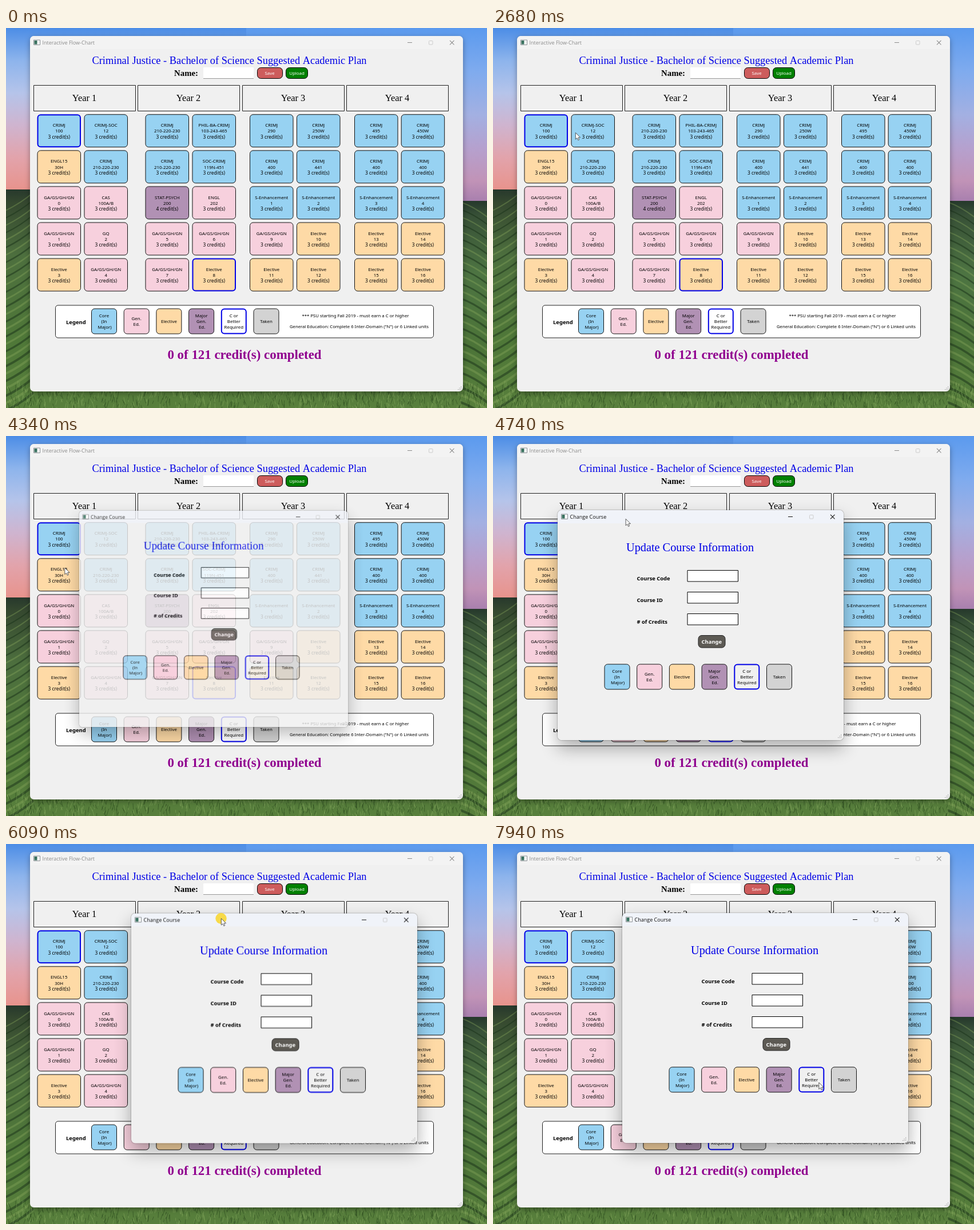
Recreate the animation shown at these times as an HTML page with a canvas. Size 841 px wide and 666 px high, loop 8000 ms.

```html
<!DOCTYPE html>
<html lang="en">
<head>
<meta charset="utf-8">
<title>Interactive Flow-Chart</title>
<style>
  html, body { margin: 0; width: 100%; height: 100%; overflow: hidden; }
  canvas, svg { position: absolute; left: 0; top: 0; }
  #dialog { transform-origin: 0 0; border-radius: 7px;
    box-shadow: 0 14px 30px rgba(0,0,0,.32), 0 0 2px rgba(0,0,0,.55); }
  #pointer { overflow: visible; }
</style>
</head>
<body>
<canvas id="base" width="841" height="666"></canvas>
<canvas id="dialog" width="500" height="403"></canvas>
<svg id="pointer" width="1" height="1">
  <circle id="press" r="9.7" fill="#f8d52a" fill-opacity=".85"/>
  <path d="M.3 0V11.6L3 9.2 4.8 13.2 6.7 12.4 5 8.4H8.6Z" fill="#fff" stroke="#333" stroke-width=".8"/>
</svg>
<script>
const $ = id => document.getElementById(id);
const SERIF = '"Liberation Serif", "Times New Roman", serif';
const SANS = '"Noto Sans", Tahoma, sans-serif';
const UI = '"Open Sans", "Segoe UI", sans-serif';
const BLUE = '#0000e6';
const FILL = { b: '#97d2f2', p: '#f7d0dd', e: '#fedaa6', m: '#b191b4', t: '#d3d3d3', n: 'transparent' };
let ctx;

function text(str, x, y, font, color = '#000', align = 'center') {
  ctx.font = font;
  ctx.fillStyle = color;
  ctx.textAlign = align;
  ctx.textBaseline = 'alphabetic';
  ctx.fillText(str, x, y);
}

function box(x, y, w, h, r, fill, stroke = '#000', line = 1) {
  ctx.beginPath();
  ctx.roundRect(x, y, w, h, r);
  ctx.fillStyle = fill;
  ctx.fill();
  if (!stroke) return;
  ctx.strokeStyle = stroke;
  ctx.lineWidth = line;
  ctx.stroke();
}

function line(color, width, ...points) {
  ctx.beginPath();
  points.forEach(([x, y], i) => i ? ctx.lineTo(x, y) : ctx.moveTo(x, y));
  ctx.strokeStyle = color;
  ctx.lineWidth = width;
  ctx.stroke();
}

// Rounded tile with centred lines of text; required tiles get a blue border.
function tile(x, y, w, h, kind, required, lines) {
  if (required) box(x + .5, y + .5, w - 1, h - 1, 5, FILL[kind], BLUE, 2);
  else box(x, y, w, h, 5.5, FILL[kind], '#111');
  lines.forEach((s, i) => {
    const size = s.includes('credit') ? 8.4 : 7.9;
    text(s, x + w / 2, y + h / 2 + 3.2 + (i - (lines.length - 1) / 2) * 10.1, `${size}px ${SANS}`);
  });
}

function swatches(x, y) {
  ['b|Core|(In| Major)', 'p|Gen.|Ed.', 'e|Elective', 'm|Major|Gen.| Ed.', 'n|C or|Better|Required', 't|Taken']
    .forEach((item, i) => {
      const [kind, ...lines] = item.split('|');
      tile(x + i * 56.7, y, 44, 44, kind, kind === 'n', lines);
    });
}

function titleBar(x, y, w, title, color, fill) {
  box(x, y, w, 23, [7, 7, 0, 0], fill, null);
  box(x + 6.5, y + 7, 11, 8.5, 0, '#fff', '#8a8f94');
  box(x + 7.5, y + 8, 5, 6.5, 0, '#39705f', null);
  text(title, x + 21.5, y + 15.3, `9px ${UI}`, color, 'left');
  const r = x + w, m = y + 11.5;
  line(color, 1, [r - 97, m], [r - 89, m]);
  box(r - 59.5, m - 3, 6.5, 6.5, 1, 'transparent', '#ccc');
  line(color, 1.1, [r - 23, m - 3.7], [r - 15.5, m + 3.8]);
  line(color, 1.1, [r - 15.5, m - 3.7], [r - 23, m + 3.8]);
}

function grip(x, y) {
  for (const [i, j] of [[0, 0], [0, 1], [1, 0], [0, 2], [2, 0], [1, 1]])
    box(x - i * 2.5, y - j * 2.5, 1.3, 1.3, 0, '#aaa', null);
}

function gradient(x, y, w, h, y2, stops) {
  const g = ctx.createLinearGradient(0, y, 0, y2);
  stops.forEach(([at, color]) => g.addColorStop(at, color));
  ctx.fillStyle = g;
  ctx.fillRect(x, y, w, h);
}

function landscape() {
  let seed = 7;
  const rnd = () => (seed = seed * 16807 % 2147483647) / 2147483647;
  gradient(0, 0, 420, 284, 284, [[0, '#4c8de6'], [.2, '#8db4ec'], [.4, '#b5c4ea'], [.6, '#cfb4cf'], [.8, '#e2a3ab'], [1, '#e8938c']]);
  gradient(420, 0, 421, 304, 304, [[0, '#5b9aee'], [.25, '#7fabee'], [.5, '#a3b0e2'], [.7, '#b6a0cd'], [.88, '#c193b7'], [1, '#a87fae']]);
  gradient(0, 283, 420, 383, 666, [[0, '#27382c'], [.06, '#35482f'], [.3, '#4d6f3e'], [.7, '#4f7838'], [1, '#587f3c']]);
  gradient(420, 303, 421, 363, 666, [[0, '#25382b'], [.07, '#385137'], [.35, '#4d7442'], [.7, '#4c7438'], [1, '#587f3c']]);
  for (let i = 0; i < 28; i++) {
    const y = 310 + i * 13;
    ctx.lineWidth = 2 + i * .08;
    ctx.strokeStyle = i % 2 ? 'rgba(24,48,24,.5)' : 'rgba(140,172,96,.35)';
    ctx.beginPath();
    ctx.moveTo(-5, y + 12);
    ctx.quadraticCurveTo(25, y - 2, 48, y - 22);
    ctx.moveTo(795, y - 5);
    ctx.quadraticCurveTo(820, y + 4, 845, y + 24);
    ctx.stroke();
  }
  for (let i = 0; i < 900; i++) {
    const x = rnd() * 841, y = 628 + rnd() * 45;
    line(i % 2 ? 'rgba(30,58,22,.45)' : 'rgba(150,186,108,.4)', 1, [x, y], [x + rnd() * 8 - 4, y - 5 - rnd() * 8]);
  }
}

const ROWS = [
  'b!CRIMJ|100,bCRIMJ-SOC|12,bCRIMJ|210-220-230,bPHIL-BA-CRIMJ|103-243-465,bCRIMJ|290,bCRIMJ|250W,bCRIMJ|495,bCRIMJ|450W',
  'eENGL15|30H,bCRIMJ|210-220-230,bCRIMJ|210-220-230,bSOC-CRIMJ|119N-451,bCRIMJ|400,bCRIMJ|441,bCRIMJ|400,bCRIMJ|400',
  'pGA/GS/GH/GN|0,pCAS|100A/B,mSTAT-PSYCH|200,pENGL|202,bS-Enhancement|1,bS-Enhancement|2,bS-Enhancement|3,bS-Enhancement|4',
  'pGA/GS/GH/GN|1,pGQ|2,pGA/GS/GH/GN|5,pGA/GS/GH/GN|6,pGA/GS/GH/GN|9,eElective|10,eElective|13,eElective|14',
  'eElective|3,pGA/GS/GH/GN|4,pGA/GS/GH/GN|7,e!Elective|8,eElective|11,eElective|12,eElective|15,eElective|16'
];
const COLUMNS = [55, 137, 244, 326, 426.5, 508.5, 609.5, 691.2];

function drawBase() {
  ctx = $('base').getContext('2d');
  landscape();
  ctx.shadowColor = 'rgba(0,0,0,.35)';
  ctx.shadowBlur = 10;
  ctx.shadowOffsetY = 3;
  box(42, 14, 757, 623, 7, '#f0f0f0', null);
  ctx.shadowColor = 'transparent';
  titleBar(42, 14, 757, 'Interactive Flow-Chart', '#8b8b8b', '#f3f3f3');
  grip(795, 633);

  text('Criminal Justice - Bachelor of Science Suggested Academic Plan', 390.5, 63, `18.4px ${SERIF}`, BLUE);
  text('Name:', 315, 84, `bold 14.8px ${SERIF}`);
  box(345, 69, 88, 20, 1, '#fff', null);
  line('#999', 1, [345, 88.5], [433, 88.5]);
  box(439.5, 69.5, 44, 19, 6, '#cd5c5c');
  box(489.5, 69.5, 38, 19, 6, '#008000');
  text('Save', 461, 82.3, `7.9px ${SANS}`, '#fff');
  text('Upload', 508.5, 82.3, `7.9px ${SANS}`, '#fff');

  for (let i = 0; i < 4; i++) {
    const x = Math.round(48 + i * 182.4) + .5;
    box(x, 100.5, 178, 45, 0, 'transparent', '#222');
    text('Year ' + (i + 1), x + 88.5, 128, `16.4px ${SERIF}`);
  }

  ROWS.forEach((row, r) => row.split(',').forEach((cell, c) => {
    const required = cell[1] === '!';
    const lines = cell.slice(required ? 2 : 1).split('|');
    lines.push((cell[0] === 'm' ? 4 : 3) + ' credit(s)');
    tile(COLUMNS[c], 151.7 + r * 63.1, 75.5, 57, cell[0], required, lines);
  }));

  box(86.5, 486, 661, 57, 4.5, '#fff', '#222');
  text('Legend', 105, 518.5, `bold 9.5px ${SANS}`, '#000', 'left');
  swatches(149.5, 492);
  text('*** PSU starting Fall 2019 - must earn a C or higher', 611, 506.6, `7.75px ${SANS}`);
  text('General Education: Complete 6 Inter-Domain ("N") or 6 Linked units', 617.5, 525.5, `7.7px ${SANS}`);
  text('0 of 121 credit(s) completed', 417, 579.5, `bold 22.9px ${SERIF}`, '#90008f');
}

function drawDialog() {
  ctx = $('dialog').getContext('2d');
  box(0, 0, 500, 403, 7, '#f0f0f0', null);
  titleBar(0, 0, 500, 'Change Course', '#111', '#f0f3f9');
  grip(495, 398);
  text('Update Course Information', 231.5, 71.5, `20.3px ${SERIF}`, BLUE);
  ['Course Code', 'Course ID', '# of Credits'].forEach((label, i) => {
    const y = 105.5 + i * 38;
    text(label, 138.5, y + 17, `bold 9.4px ${SANS}`, '#000', 'left');
    box(227, y, 88.5, 19.5, 0, '#fff');
  });
  box(246, 219.5, 47, 21.5, 6, '#5d5a54', '#222');
  text('Change', 269.3, 234, `bold 9.4px ${SANS}`, '#fff');
  swatches(82, 270);
}

// Keyframes: [ms, x, y]
const POINTER = [
  [410, 577, 655], [600, 380, 543], [860, 380, 543], [1050, 508, 630], [1350, 320, 470], [1480, 252, 375],
  [1620, 290, 400], [1690, 303, 411], [2200, 109, 225], [2470, 145, 189], [2540, 138, 186], [2820, 150, 181],
  [3370, 150, 181], [3860, 102.5, 231], [4400, 102.5, 231], [4810, 258, 128], [4880, 259, 128],
  [5090, 266, 138], [5360, 268, 139], [5690, 268, 139], [5820, 304, 131], [6090, 376, 130.5],
  [6440, 381, 130], [6710, 383, 132], [7120, 600, 423], [7260, 615, 417], [7870, 592, 417], [7940, 569.5, 418]
];
const DIALOG = [[5690, 113, 130], [5820, 138, 122], [6090, 219, 121.5], [6440, 226, 121]];
const PRESSES = [[4060, 4130], [4200, 4260], [5360, 6510]];

function along(keys, t) {
  const i = keys.findIndex(k => k[0] > t);
  if (i < 1) return keys[i ? keys.length - 1 : 0].slice(1);
  const [a, b] = [keys[i - 1], keys[i]];
  const p = (t - a[0]) / (b[0] - a[0]);
  return [a[1] + (b[1] - a[1]) * p, a[2] + (b[2] - a[2]) * p];
}

function frame() {
  const t = performance.now() % 8000;
  const [px, py] = along(POINTER, t);
  $('pointer').style.display = t < 410 ? 'none' : '';
  $('pointer').style.transform = `translate(${px}px, ${py}px)`;
  $('press').style.display = PRESSES.some(([a, b]) => t >= a && t < b) ? '' : 'none';

  // The dialog fades in while growing to full size.
  const k = Math.min(1, Math.max(0, (t - 4270) / 175));
  const scale = .9 + .1 * k;
  const [dx, dy] = along(DIALOG, t);
  const style = $('dialog').style;
  style.opacity = Math.min(1, k * 2);
  style.transform = `translate(${dx + (1 - scale) * 250}px, ${dy + (1 - scale) * 17}px) scale(${scale})`;
  requestAnimationFrame(frame);
}

drawBase();
drawDialog();
frame();
</script>
</body>
</html>
```
